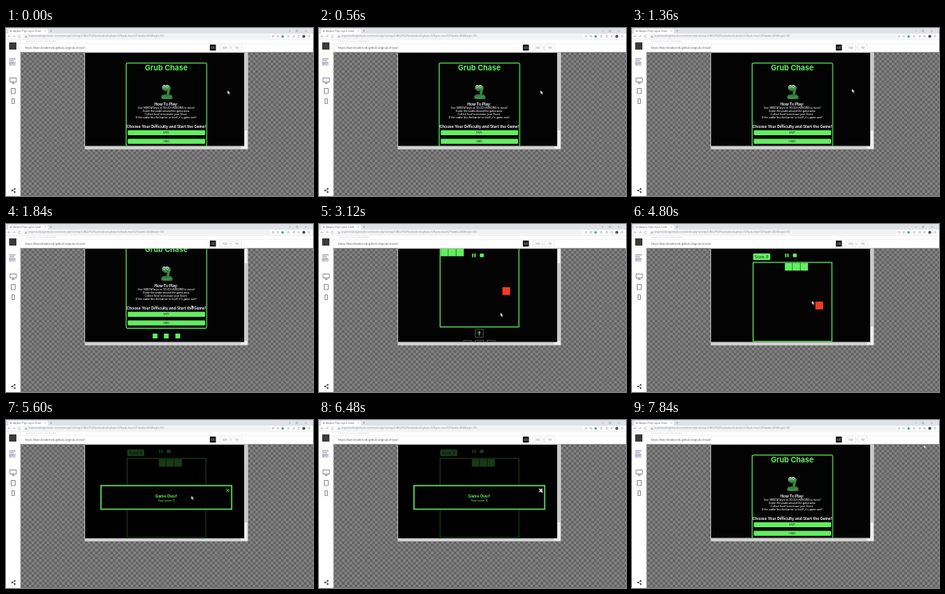
These frames come from a looping animation (384 px wide and 210 px high, 7920 ms). An HTML page:

```html
<!DOCTYPE html>
<html lang="en">
<head>
<meta charset="utf-8">
<title>Layout preview</title>
<style>
  html, body { margin: 0; width: 100%; height: 100%; overflow: hidden; background: #fff; }
  body > svg { display: block; width: 384px; height: 210px; }
  text { font-family: "Liberation Sans", Arial, sans-serif; }
  .page text { font-family: Inter, sans-serif; font-weight: 500; }
  .mid { text-anchor: middle; }
  .page .bold, .bold { font-weight: 700; }
  .line { fill: none; stroke: #5ad858; }
  .lime { fill: #63ee61; }
  .icon { fill: none; stroke: #62656c; stroke-width: .7; }
  .thin { fill: none; stroke: #8d9096; stroke-width: .5; }
</style>
</head>
<body>
<svg viewBox="0 0 384 210">
  <defs>
    <pattern id="check" y="14.700" width="6.370" height="6.370" viewBox="0 0 2 2" patternUnits="userSpaceOnUse">
      <rect width="2" height="2" fill="#858585"/>
      <path d="M0 0h1v2h1v-1h-2z" fill="#606060"/>
    </pattern>
  </defs>
  <rect width="384" height="210" fill="#fff"/>
  <rect x="18" y="30" width="366" height="180" fill="url(#check)"/>

  <!-- browser -->
  <rect width="384" height="7" fill="#dee1e6"/>
  <path d="M3 7V2.500q0-1.500 1.500-1.500H51q1.500 0 1.500 1.500V7z" fill="#fff"/>
  <circle cx="6" cy="3.700" r="1" fill="#8a90a0"/>
  <text x="9" y="4.700" font-size="2.700" fill="#777">Adaptive Page Layout Viewer</text>
  <path class="thin" d="M48.500 2.800l1.600 1.600m0-1.600l-1.600 1.600M55 3.600h2.400m-1.200-1.200v2.400M354 3.600h2M363 2.600h2v2h-2zM374 2.600l2 2m0-2l-2 2"/>
  <rect y="7" width="384" height="7" fill="#fbfbfc"/>
  <rect x="22" y="7.800" width="309" height="5.200" rx="2.600" fill="#f0f2f4"/>
  <path class="thin" d="M5.500 10.400h-3l1.200-1.200m-1.200 1.200l1.200 1.200M8.500 10.400h3l-1.200-1.200M18 9.500a1.500 1.500 0 1 0 .3 1.500M24 10h2v1.500h-2z"/>
  <text x="28" y="11.400" font-size="2.800" fill="#999">responsivedesignchecker.com/checker.php?url=https%3A%2F%2Fkarolinabrevik.github.io%2Fgrub-chase%2F&amp;width=1400&amp;height=700</text>
  <g id="tools"></g>
  <circle cx="346" cy="10.400" r="1.500" fill="#3aa76d"/>
  <circle cx="372.500" cy="10.400" r="1.900" fill="#55575c"/>
  <path d="M0 14.200h384" stroke="#d7d9dc" stroke-width=".5"/>

  <!-- page header and side bar -->
  <text x="24" y="17.300" font-size="2.500" fill="#b99aa6">ADAPTIVE LAYOUT PREVIEWER</text>
  <path d="M18 19.300h366M18 30h366M18 19v191" stroke="#e2e2e2" stroke-width=".5"/>
  <text x="24" y="25.700" font-size="4" fill="#666">https://karolinabrevik.github.io/grub-chase/</text>
  <rect x="255" y="20.700" width="7.500" height="7.500" fill="#111"/>
  <text class="mid" x="258.700" y="25.600" font-size="3.200" fill="#ddd">GO</text>
  <path d="M267.500 21h12v7h-12zM282.500 21h12v7h-12z" fill="none" stroke="#ddd" stroke-width=".5"/>
  <g class="mid" font-size="2.900" fill="#888">
    <text x="273.500" y="25.600">1024</text><text x="281" y="25.600">×</text><text x="288.500" y="25.600">768</text>
  </g>
  <rect x="4" y="18" width="9" height="9" fill="#3a3a3a"/>
  <path d="M4 38.700h8M4 41h6M4 43.300h8" stroke="#6a6a92" stroke-width=".8"/>
  <text class="mid" x="8" y="47.300" font-size="2.700" fill="#5a5a88">MENU</text>
  <path class="icon" d="M5 62.500h8v5H5zM9 67.500v1.800M7 69.300h4M6.500 75.500h5v6.500h-5zM7.500 88.500h3v6h-3z"/>
  <path class="icon" d="M11 201l-3.500 2 3.500 2"/>
  <path d="M10 200.200h1.700v1.700h-1.700zM6.700 202.200h1.700v1.700h-1.700zM10 204.200h1.700v1.700h-1.700z" fill="#333"/>

  <!-- previewed device -->
  <rect x="98.500" y="30.500" width="204" height="121" fill="#eee"/>
  <rect id="thumb" x="298.700" y="31" width="2.900" height="97" fill="#c4c4c4"/>
  <rect x="99" y="148" width="195" height="2.600" fill="#cfcfcf"/>
  <svg class="page" x="99" y="31" width="199" height="116.500" viewBox="99 31 199 116.500">
    <rect x="99" y="31" width="199" height="117" fill="#020302"/>

    <g id="home"><g id="homeScroll">
      <rect class="line" x="150.300" y="43.800" width="100.700" height="104.500" rx="1.500" stroke-width="1.200"/>
      <text class="mid bold lime" x="200.500" y="53.400" font-size="9.300">Grub Chase</text>
      <path d="M203 76q1 4-1 7" fill="none" stroke="#3c8a42" stroke-width="3"/>
      <path d="M194 87q0-4 4-4h6q4 0 4.500 4 0 2-3 2h-9q-2.500 0-2.500-2z" fill="#2f7a38"/>
      <path d="M195.500 86.500q5 1.500 11-.5" fill="none" stroke="#57b45c" stroke-width=".8"/>
      <ellipse cx="200.500" cy="75" rx="5.500" ry="4" fill="#3f9447"/>
      <path d="M196 77q3 2 7 .5" fill="none" stroke="#123d12" stroke-width=".7"/>
      <g fill="#e8efe4"><circle cx="197.700" cy="73" r="1.700"/><circle cx="201.800" cy="73" r="1.700"/></g>
      <circle cx="197.700" cy="73.200" r=".7"/><circle cx="201.800" cy="73.200" r=".7"/>
      <g class="mid" fill="#f4f4f4" font-size="3.150">
        <text class="bold" x="200.500" y="96.700" font-size="4.750">How To Play:</text>
        <text x="200.500" y="101.300">Use ARROW keys or TOUCH ARROWS to move!</text>
        <text x="200.500" y="105.300">Guide the snake around the game area.</text>
        <text x="200.500" y="109.300">Collect food to increase your Score.</text>
        <text x="200.500" y="113.300">If the snake hits the barrier or itself, it's game over!</text>
        <text class="bold" x="200.500" y="124.700" font-size="4.750">Choose Your Difficulty and Start the Game!</text>
      </g>
      <rect class="lime" x="152.300" y="127.800" width="96.700" height="6.300" rx="1"/>
      <rect class="lime" x="152.300" y="138.400" width="96.700" height="6.300" rx="1"/>
      <g class="mid" font-size="2.800" fill="#10350f">
        <text x="200.500" y="132">EASY</text><text x="200.500" y="142.600">HARD</text>
      </g>
      <path class="lime" d="M183.500 155h6v6h-6zM197.500 155h6v6h-6zM211.800 155h6v6h-6z"/>
    </g></g>

    <g id="game">
      <g id="gameScroll">
        <rect class="lime" x="151.500" y="36.800" width="21.500" height="8.300" rx="1.500"/>
        <text class="mid" x="162.200" y="42.500" font-size="4.200" fill="#123d12">Score: 0</text>
        <rect class="line" x="151.500" y="48" width="98.500" height="98.700" stroke-width="1.300"/>
        <rect x="229.400" y="97" width="9.600" height="9.800" fill="#f23a20"/>
        <g id="snake"></g>
        <g id="keys"></g>
        <path d="M200.500 157.300v-5m-2.200 2.200l2.200-2.300 2.200 2.300" class="line" stroke-width="1"/>
      </g>
      <path class="lime" d="M191.500 37h1.600v4.600h-1.600zM194.300 37h1.600v4.600h-1.600z"/>
      <rect class="lime" x="201.200" y="37" width="4.900" height="4.600" rx=".8"/>
    </g>

    <g id="over">
      <rect x="99" y="31" width="199" height="117" fill="#000" opacity=".76"/>
      <rect class="line" x="118.800" y="82" width="163.500" height="29.500" stroke-width="1.600" style="fill:#010201"/>
      <text class="mid bold lime" x="200.500" y="97.200" font-size="4.750">Game Over!</text>
      <text class="mid lime" x="200.500" y="101.900" font-size="3.300">Your score: 0</text>
      <path class="line" d="M275.500 86l3.800 4.200m0-4.200l-3.800 4.200" stroke-width="1"/>
      <path id="hover" d="M275.500 86l3.800 4.200m0-4.200l-3.800 4.200" stroke="#fff" stroke-width="1.200"/>
    </g>
  </svg>

  <path id="cursor" d="M0 0v4.600l1.100-1 .9 1.800.9-.4-.8-1.700h1.500z" fill="#fff" stroke="#222" stroke-width=".35"/>
</svg>
<script>
const LOOP = 7920;
const $ = id => document.getElementById(id);

function add(parent, tag, attrs) {
  const el = document.createElementNS("http://www.w3.org/2000/svg", tag);
  for (const k in attrs) el.setAttribute(k, attrs[k]);
  $(parent).append(el);
}

for (let i = 0; i < 3; i++) {
  add("snake", "rect", { class: "lime", x: 152.2 + i * 9.75, y: 48.7, width: 9.4, height: 9.6 });
  add("keys", "rect", { x: 181 + i * 14.8, y: 163.5, width: 9.6, height: 9.6, class: "icon" });
}
add("keys", "rect", { x: 195.7, y: 149.7, width: 9.6, height: 9.6, class: "icon" });
for (const x of [334, 340, 353, 360, 366, 379])
  add("tools", "circle", { cx: x, cy: 10.4, r: 1, class: "thin" });

// Each row is [time, ...values]; hold keeps a value until the next row.
function play(id, rows, pose, hold) {
  const all = [...rows, [LOOP, ...rows[rows.length - 1].slice(1)]];
  $(id).animate(all.map(([t, ...v]) => ({
    offset: t / LOOP, easing: hold ? "steps(1, end)" : "linear", ...pose(...v)
  })), { duration: LOOP, iterations: Infinity });
}
const move = (x, y) => ({ transform: `translate(${x}px, ${y}px)` });
const scroll = y => move(0, -y);
const fade = opacity => ({ opacity });

play("home", [[0, 1], [2640, 0], [6640, 1]], fade, true);
play("game", [[0, 0], [2640, 1], [6640, 0]], fade, true);
play("over", [[0, 0], [5180, 0], [5360, 1], [6630, 1], [6640, 0]], fade);
play("hover", [[0, 0], [6320, 1], [6640, 0]], fade, true);

play("homeScroll", [[0, 0], [1440, 0], [1760, 18], [6600, 18], [6601, 0]], scroll);
play("gameScroll", [[0, 18], [3200, 18], [3680, 0]], scroll);
play("thumb", [[0, 0], [1440, 0], [1760, 18], [3200, 18], [3680, 0]], y => move(0, y));
play("snake", [[0, 0], [3200, 1], [3520, 2], [4080, 3], [4640, 4]], n => move(n * 9.75, 0), true);

play("cursor", [
  [0, 277, 78], [1280, 277, 78], [1360, 275, 76], [1520, 275, 76],
  [1840, 232, 101], [2080, 246, 113], [2240, 246, 113], [2400, 225, 113],
  [3120, 227, 111], [3760, 227, 111], [3920, 225, 96], [5520, 225, 96],
  [6160, 277, 86], [7280, 277, 86], [7840, 365, 31]
], move);
</script>
</body>
</html>
```
